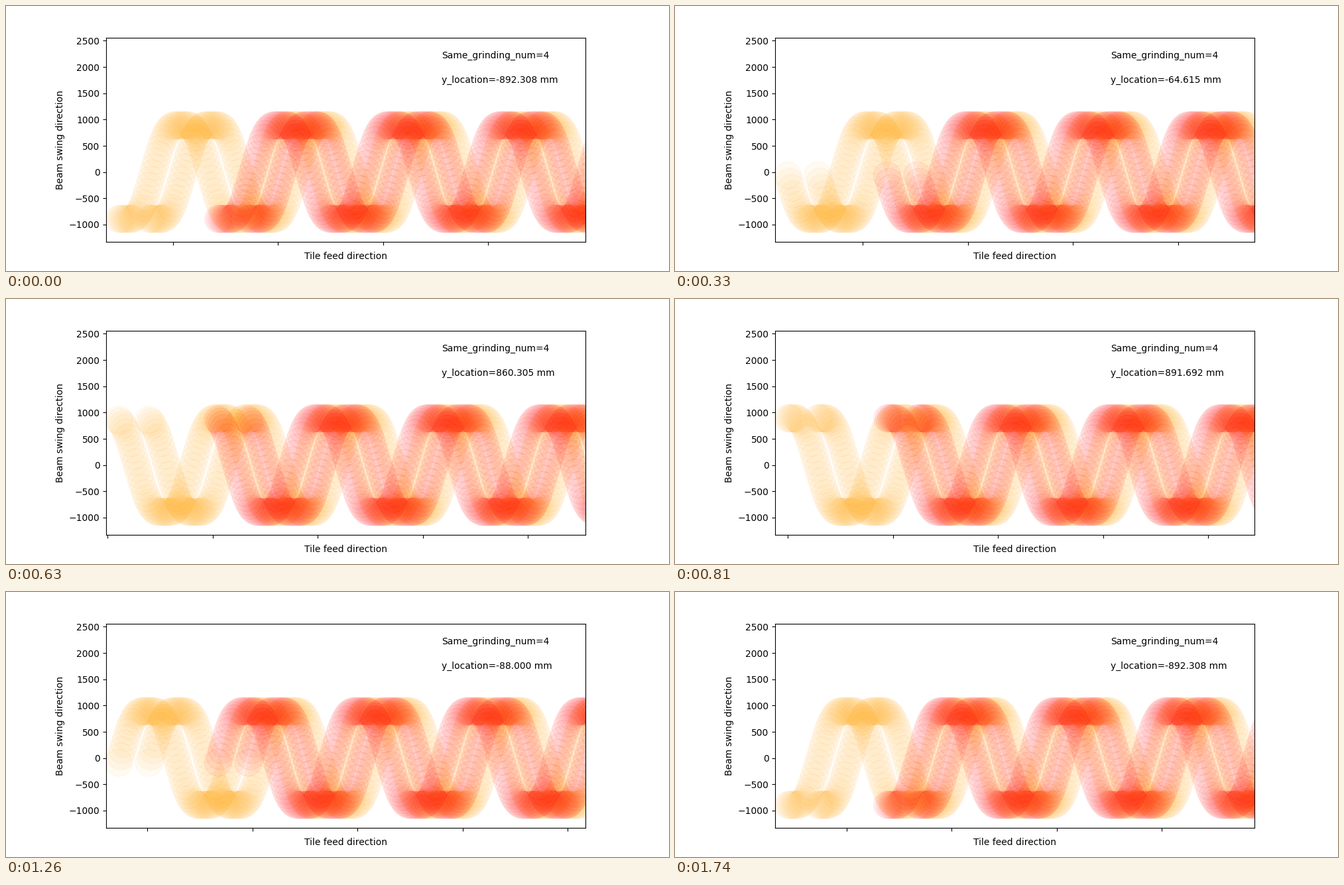
A matplotlib script that plays this animation: 1000 px wide and 400 px high, repeating every 1770 ms.

```python
import numpy as np
import matplotlib.pyplot as plt
from matplotlib.animation import FuncAnimation
from matplotlib.collections import EllipseCollection
from matplotlib.colors import to_rgba
from matplotlib.ticker import NullFormatter

FRAMES, INTERVAL = 59, 30
DT = 0.15                          # simulated seconds per frame
SPEED, ACCEL = 800.0, 650.0        # beam swing, mm/s and mm/s2
FEED = 240.0                       # tile feed, mm/s
RAMP, CRUISE, DWELL = 1.23, 1.0, 1.0
HALF = 2 * RAMP + CRUISE + DWELL
LOW = -400 - SPEED**2 / (2 * ACCEL)
RADIUS = 260
WIDTH = 9120                       # visible length of the feed axis
HEADS = [(240, "orange"), (815, "orange"), (2130, "red"), (2705, "red")]


def stroke(s):
    """Distance covered s seconds into one swing: ramp up, cruise, ramp down."""
    up = np.clip(s, 0, RAMP)
    mid = np.clip(s - RAMP, 0, CRUISE)
    down = np.clip(s - RAMP - CRUISE, 0, RAMP)
    return (ACCEL / 2 * up**2 + SPEED * mid
            + SPEED * down - ACCEL / 2 * down**2)


def beam_y(t):
    s = np.mod(t, 2 * HALF)
    return LOW + stroke(s) - stroke(s - HALF)


fig = plt.figure(figsize=(10, 4), dpi=100, facecolor="white")
ax = fig.add_axes([0.1511, 0.11, 0.7228, 0.77])
ax.set_xlim(0, WIDTH)
ax.set_ylim(-1329, 2556.6)
ax.set_yticks(range(-1000, 2501, 500))
ax.xaxis.set_major_formatter(NullFormatter())
ax.set_xlabel("Tile feed direction")
ax.set_ylabel("Beam swing direction")
ax.xaxis.set_label_coords(0.5, -15.3 / 308)

# Ages of the footprints left by each head, oldest first
ages, xs, colors = [], [], []
for start, color in HEADS:
    count = int((WIDTH + RADIUS - start) / (FEED * DT)) + 1
    age = DT * np.arange(count)[::-1]
    ages.append(age)
    xs.append(start + FEED * age)
    colors += [to_rgba(color, 0.05)] * count
ages, xs = np.concatenate(ages), np.concatenate(xs)

size = np.full(len(xs), 2 * RADIUS)
trail = EllipseCollection(size, size, np.zeros(len(xs)), units="x",
                          offsets=np.column_stack([xs, beam_y(-ages)]),
                          offset_transform=ax.transData,
                          facecolors=colors, edgecolors=colors,
                          linewidths=1, zorder=1)
ax.add_collection(trail, autolim=False)

ax.text(0.7, 0.9, "Same_grinding_num=4", transform=ax.transAxes)
readout = ax.text(0.7, 0.78, "", transform=ax.transAxes)


def update(k):
    t = k * DT
    trail.set_offsets(np.column_stack([xs, beam_y(t - ages)]))
    readout.set_text(f"y_location={beam_y(t):.3f} mm")
    first = (1269 + FEED * t) % 2000
    ax.set_xticks(np.arange(first, WIDTH, 2000))
    return trail, readout


anim = FuncAnimation(fig, update, frames=FRAMES, interval=INTERVAL,
                     init_func=lambda: update(0), repeat=True,
                     repeat_delay=0, blit=False)
plt.show()
```
